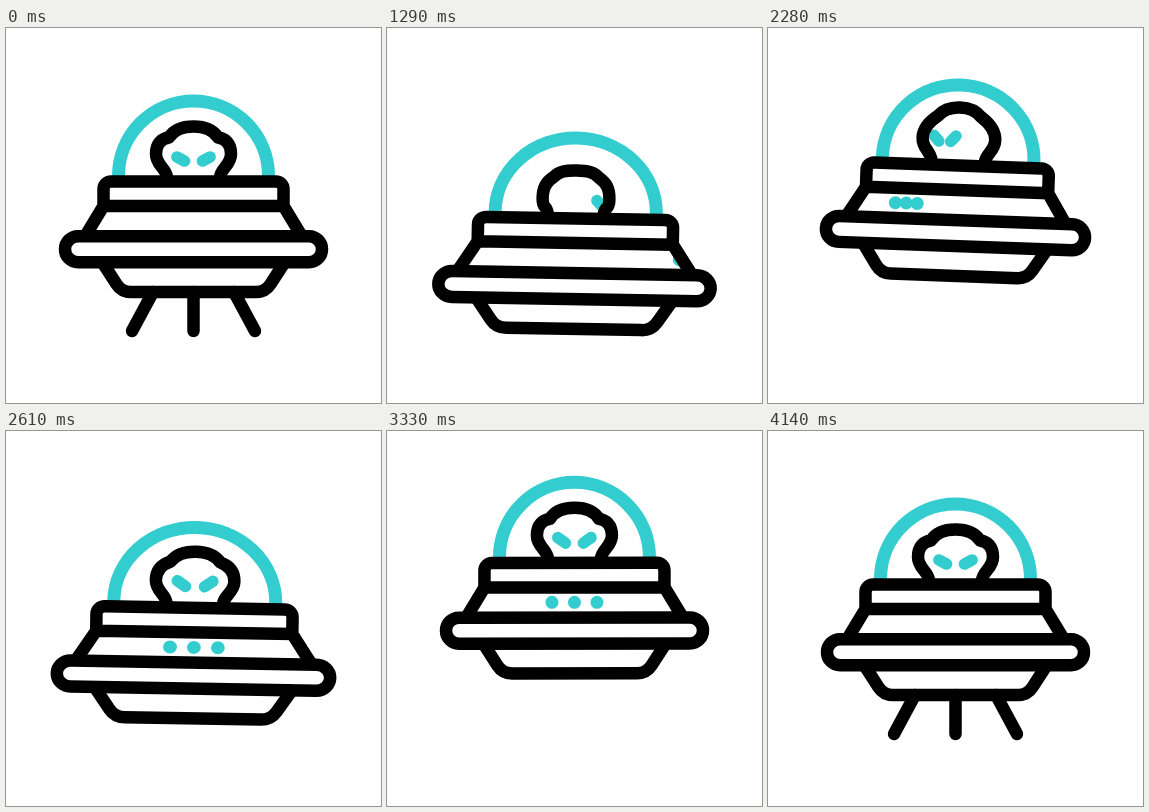
Write an HTML page with a canvas that moves like this. It is 375x375 px and loops after 4.5 s.

```html
<!DOCTYPE html>
<html lang="en">
<head>
<meta charset="utf-8">
<title>Flying saucer</title>
<style>
html, body { margin: 0; width: 100%; height: 100%; overflow: hidden; background: #fff; }
canvas { display: block; }
</style>
</head>
<body>
<canvas id="stage" width="375" height="375"></canvas>
<script>
const ctx = document.getElementById('stage').getContext('2d');
const LOOP = 4500, STEP = 30, CYAN = '#33cdcf', BLACK = '#000';
const CENTER = 187.5, PIVOT = 221;

const clamp = x => Math.max(0, Math.min(1, x));
const ease = x => (1 - Math.cos(Math.PI * clamp(x))) / 2;

// Eased value at time t through [time, value] pairs.
function key(t, ...keys) {
  let [t0, v] = keys[0];
  for (const [t1, v1] of keys) {
    if (t < t1) return v + (v1 - v) * ease((t - t0) / (t1 - t0));
    t0 = t1;
    v = v1;
  }
  return v;
}

// Sideways shift of the face and lights: out to the right, back in from the left.
function turn(t) {
  if (t < 2050) return 140 * clamp((t - 570) / 815) ** 2;
  return -140 * (1 - clamp((t - 2050) / 570)) ** 2;
}

// All shapes are symmetric: x counts from the middle, only the left half is given.
const mirror = points => points.map(([x, y]) => [-x, y]).reverse();

function rounded(left, radius) {
  const points = [...left, ...mirror(left)], path = new Path2D();
  path.moveTo(...points[0]);
  for (let i = 1; i < points.length - 1; i++) {
    path.arcTo(...points[i], ...points[i + 1], radius);
  }
  path.lineTo(...points.at(-1));
  return path;
}

// Foot, cheek, brow and crown, joined by curves.
function headPath(round, skull) {
  const cheek = 37.5 - 6 * round - 1.5 * skull, cheekY = 126 + 8 * round + skull;
  const brow = 24.5 - 3 * (round + skull), browY = 109.5 + 3 * round - 5 * skull;
  const crown = 98.5 + 7 * round - 3 * skull, smooth = 4 * (round + skull);
  const left = [
    [-26.5, 149], [-27.5, 140], [-cheek, cheekY + 11], [-cheek, cheekY],
    [-cheek, cheekY - 11], [-brow - 7, browY + 1 + smooth], [-brow, browY],
    [-brow + 5, browY - 8 + smooth / 2], [-10, crown]
  ];
  const points = [...left, [0, crown], ...mirror(left)], path = new Path2D();
  path.moveTo(...points[0]);
  for (let i = 1; i < points.length; i += 3) {
    path.bezierCurveTo(...points[i], ...points[i + 1], ...points[i + 2]);
  }
  return path;
}

const dome = new Path2D();
dome.arc(0, 148, 75, Math.PI, 0);
const cabin = rounded([[-107, 206], [-90, 178], [-90, 153.5]], 7.5);
cabin.moveTo(-90, 178);
cabin.lineTo(90, 178);
const hull = rounded([[-90, 236], [-72, 264]], 17);
const ring = new Path2D();
ring.roundRect(-128.5, 208.2, 257, 26, 13);

function draw(t) {
  const y = key(t, [570, 0], [1305, 37], [1935, -52], [2650, 24], [3370, -22], [4120, 0]);
  const tilt = key(t, [570, 0], [1270, 1], [1820, -2.1], [2300, 2.1], [3000, -.6], [3400, 0]);
  const squash = key(t, [570, 0], [1305, .06], [1935, -.04], [2655, .065], [3130, 0]);
  const legs = key(t, [250, 1], [720, 0], [3450, 0], [4050, 1]);
  const glow = key(t, [300, 0], [600, 1], [3780, 1], [4080, 0]);
  const round = key(t, [700, 0], [1290, 1], [1800, 0]);
  const skull = key(t, [1290, 0], [1800, 1], [2300, 1], [2850, 0]);
  const shift = turn(t), side = clamp(Math.abs(shift) / 51);
  const facing = Math.abs(shift) < 140;

  const place = (stretch = 1) => {
    ctx.setTransform(1, 0, 0, 1, CENTER, PIVOT + y);
    ctx.rotate(tilt * Math.PI / 180);
    ctx.scale(1 + squash * stretch, 1);
    ctx.translate(0, -PIVOT);
  };
  // Scales the outline only, so the line weight stays even.
  const stroke = (path, stretch = 1, color = BLACK, width = 12.5) => {
    place(stretch);
    const shape = new Path2D();
    shape.addPath(path, ctx.getTransform());
    ctx.resetTransform();
    ctx.strokeStyle = color;
    ctx.lineWidth = width;
    ctx.stroke(shape);
  };
  const line = (x0, y0, x1, y1, color, width) => {
    const path = new Path2D();
    path.moveTo(x0, y0);
    path.lineTo(x1, y1);
    ctx.lineCap = 'round';
    stroke(path, 1, color, width);
    ctx.lineCap = 'butt';
  };
  const clipped = (path, stretch, paint) => {
    ctx.save();
    place(stretch);
    ctx.clip(path);
    paint();
    ctx.restore();
  };

  ctx.resetTransform();
  ctx.clearRect(0, 0, 375, 375);
  ctx.lineJoin = 'round';

  if (legs > 0) {
    for (const d of [-1, 0, 1]) line(d * 40.5, 264, d * (40.5 + 21 * legs), 264 + 39 * legs);
  }

  stroke(dome, 1.25, CYAN, 13);

  const head = headPath(round, skull);
  if (facing) {
    clipped(head, 1, () => {
      const squeeze = 1 - .35 * side, slant = 2.1 + .7 * glow;
      const eyeY = 131 + 7 * round - 4 * skull;
      for (const d of [-1, 1]) {
        const x = shift * .28 + d * 12.8 * squeeze, dx = 3.9 * squeeze * d;
        line(x + dx, eyeY - slant, x - dx, eyeY + slant, CYAN, 11.5);
      }
    });
  }
  stroke(head);

  if (facing && glow > 0) {
    clipped(cabin, 1.4, () => {
      ctx.fillStyle = CYAN;
      place();
      for (const d of [-1, 0, 1]) {
        ctx.beginPath();
        ctx.arc(shift + d * 22.5 * (1 - .53 * side), 193, 6.5 * glow, 0, 7);
        ctx.fill();
      }
    });
  }

  stroke(cabin, 1.4);
  stroke(hull, 1.3);
  stroke(ring);
}

const start = performance.now();
function frame() {
  const t = (performance.now() - start) % LOOP;
  draw(Math.floor(t / STEP) * STEP);
  requestAnimationFrame(frame);
}
frame();
</script>
</body>
</html>
```
